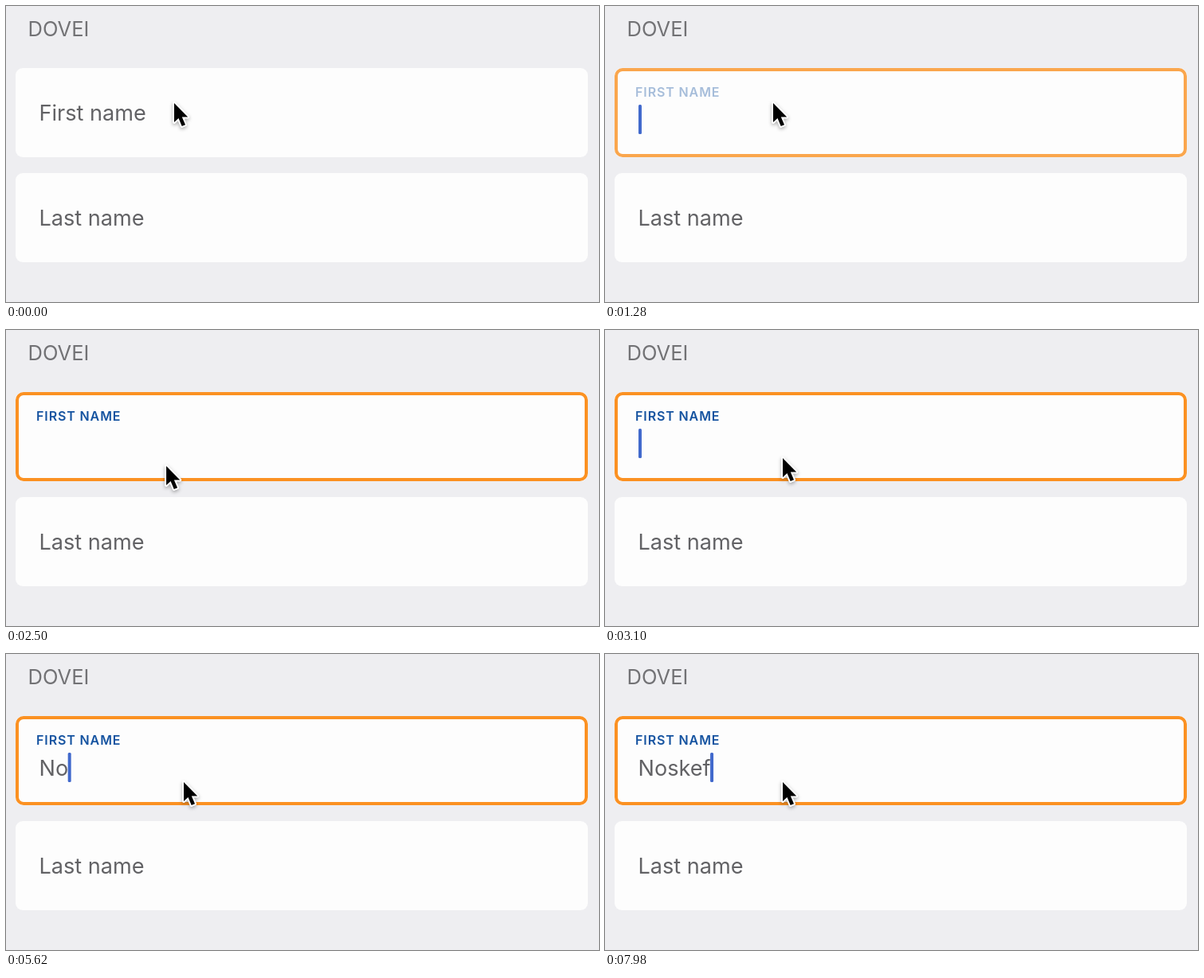
An HTML page for the animation above (8000 ms loop, 744 by 372 pixels).

```html
<!DOCTYPE html>
<html lang="en">
<head>
<meta charset="utf-8">
<title>Name form</title>
<style>
  html, body { margin: 0; width: 100%; height: 100%; overflow: hidden; background: #eeeef1; }
  svg { display: block; width: 744px; height: 372px; }
  text { font-family: Inter, Roboto, sans-serif; fill: #626265; white-space: pre; }
  .title { font-size: 25.5px; fill: #727275; }
  .entry { font-size: 27.1px; }
  .label { font-size: 16px; font-weight: 600; letter-spacing: .9px; fill: #1553a0; }
  .field { fill: #fdfdfd; }
  #ring { fill: none; stroke: #fb9122; stroke-width: 4; }
  #caret { fill: #4169cc; }
  #pointer { stroke: #fff; stroke-width: 4; stroke-linejoin: round; paint-order: stroke;
    filter: drop-shadow(0 2px 2px rgba(0, 0, 0, .3)); }
</style>
</head>
<body>
<svg viewBox="0 0 744 372">
  <text class="title" x="27.5" y="38">DOVEI</text>
  <rect class="field" x="12" y="78" width="718" height="112" rx="9"/>
  <rect class="field" x="12" y="210" width="718" height="112" rx="9"/>
  <rect id="ring" x="14" y="80" width="714" height="108" rx="8"/>
  <text id="placeholder" class="entry" x="41.5" y="144">First name</text>
  <text class="entry" x="41.5" y="276">Last name</text>
  <text id="label" class="label" x="38" y="114">FIRST NAME</text>
  <text id="value" class="entry" x="41.5" y="153"></text>
  <rect id="caret" x="42" y="124" width="4" height="37" rx="1.5"/>
  <path id="pointer" d="M0 0V24L5.5 19L9.7 29L14 27.2L9.8 17.5H17.2Z"/>
</svg>
<script>
const LOOP = 8000;
const FOCUS = 800;
const BLINK = 500;
const NAME = "Noskef";
const KEY_TIMES = [5100, 5450, 6450, 7150, 7500, 7800];
const POINTER_STEPS = [
  { at: 1600, x: 211, y: 122 },
  { at: 2480, x: 201, y: 171 },
  { at: 3050, x: 223, y: 161 }
];

const [ring, placeholder, label, value, caret, pointer] =
  ["ring", "placeholder", "label", "value", "caret", "pointer"]
    .map(id => document.getElementById(id));

const progress = (t, start, end) => Math.min(1, Math.max(0, (t - start) / (end - start)));
const ease = p => p * p * (3 - 2 * p);
const mix = (a, b, p) => a + (b - a) * p;

function pointerAt(t) {
  let pos = POINTER_STEPS[0];
  for (let i = 1; i < POINTER_STEPS.length; i++) {
    const from = POINTER_STEPS[i - 1], to = POINTER_STEPS[i];
    if (t >= from.at) {
      const p = ease(progress(t, from.at, to.at));
      pos = { x: mix(from.x, to.x, p), y: mix(from.y, to.y, p) };
    }
  }
  return pos;
}

function render(t) {
  ring.setAttribute("opacity", progress(t, FOCUS, FOCUS + 600));
  placeholder.setAttribute("opacity", 1 - progress(t, FOCUS, FOCUS + 180));
  label.setAttribute("opacity", ease(progress(t, FOCUS + 150, FOCUS + 950)));

  const typed = KEY_TIMES.filter(at => at <= t).length;
  value.textContent = NAME.slice(0, typed);
  const blinkStart = typed ? KEY_TIMES[typed - 1] : FOCUS;
  const lit = t >= FOCUS && Math.floor((t - blinkStart) / BLINK) % 2 === 0;
  caret.setAttribute("opacity", lit ? 1 : 0);
  caret.setAttribute("x", typed ? 41 + value.getComputedTextLength() : 42);

  const { x, y } = pointerAt(t);
  pointer.setAttribute("transform", `translate(${x} ${y})`);
}

const start = performance.now();
function tick() {
  render((performance.now() - start) % LOOP);
  requestAnimationFrame(tick);
}
tick();
</script>
</body>
</html>
```
